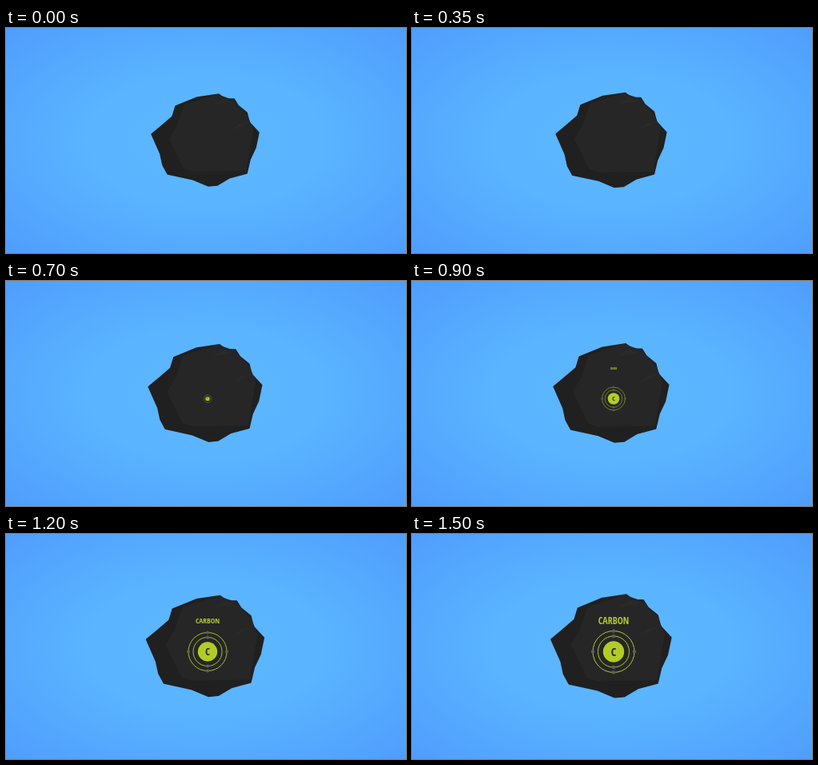
An HTML page for the animation above (1550 ms loop, 500x282 px).

```html
<!DOCTYPE html>
<html lang="en">
<head>
<meta charset="utf-8">
<title>Carbon</title>
<style>
  html, body { margin: 0; width: 100%; height: 100%; overflow: hidden; }
  body { background: radial-gradient(ellipse farthest-corner, #5cb7ff, #5ab4ff 42%, #4f9dfd); }
  svg { display: block; width: 100%; height: 100%; }
  text {
    font-family: "Noto Sans ExtraCondensed", "Open Sans Condensed", "Roboto Condensed", "Noto Sans", sans-serif;
    font-stretch: extra-condensed;
    font-weight: 500;
    text-anchor: middle;
  }
</style>
</head>
<body>
<svg viewBox="0 0 500 282">
  <g id="rock" stroke-linejoin="round">
    <path fill="#202020" stroke="#202020" stroke-width="1.5" d="M182 133L194 123L208 111L212 98L239 87L266 83L274 89L285 89L290 97L301 106L304 118L316 131L312 150L305 165L301 182L279 188L264 197L253 198L234 190L202 183L196 172L193 158Z"/>
    <path fill="#262626" d="M204 139L214 122L223 96L264 83L284 90L302 110L309 127L300 179L234 180L222 176Z"/>
    <path fill="#2a2a2a" d="M257 97L271 89L281 93ZM281 129L291 121L304 118Z"/>
  </g>
  <g id="atom">
    <g id="shells" fill="none" stroke="#b1c92c"></g>
    <circle r="13.2" fill="#b4cb27"/>
    <text y="5" font-size="14" fill="#262626">C</text>
  </g>
  <g id="label"><text id="word" font-size="100" fill="#b1c92c">CARBON</text></g>
</svg>
<script>
const LOOP = 1550, STEP = 50;
const $ = id => document.getElementById(id);

// One ring with its electrons spread evenly, starting at the top.
function shell(radius, electrons) {
  let svg = `<circle r="${radius}"/>`;
  for (let i = 0; i < electrons; i++) {
    const angle = 360 * i / electrons;
    svg += `<circle cy="${-radius}" r="2.2" fill="#5e5e5e" stroke="none" transform="rotate(${angle})"/>`;
  }
  return svg;
}
$("shells").innerHTML = shell(19.5, 2) + shell(26, 4);

// Largest undistorted size that keeps the word within its line.
const word = $("word");
const size = Math.min(15.4, 3850 / word.getComputedTextLength());
word.setAttribute("font-size", size);
word.setAttribute("y", size * 0.357 - 1.8);

const easeOut = (t, start, duration) =>
  Math.sin(Math.PI / 2 * Math.min(1, Math.max(0, (t - start) / duration)));

function place(id, x, y, scale) {
  const node = $(id);
  node.setAttribute("transform", `translate(${x} ${y}) scale(${scale})`);
  node.setAttribute("visibility", scale > 0 ? "visible" : "hidden");
}

function draw(now) {
  const t = Math.floor(now % LOOP / STEP) * STEP;
  const grow = 1 + 0.118 * t / 1500;
  place("rock", 250 * (1 - grow), 141 * (1 - grow), grow);
  place("atom", 252, 147.5, easeOut(t, 600, 800));
  place("label", 252, 110.4, easeOut(t, 800, 700));
  requestAnimationFrame(draw);
}
draw(0);
</script>
</body>
</html>
```
